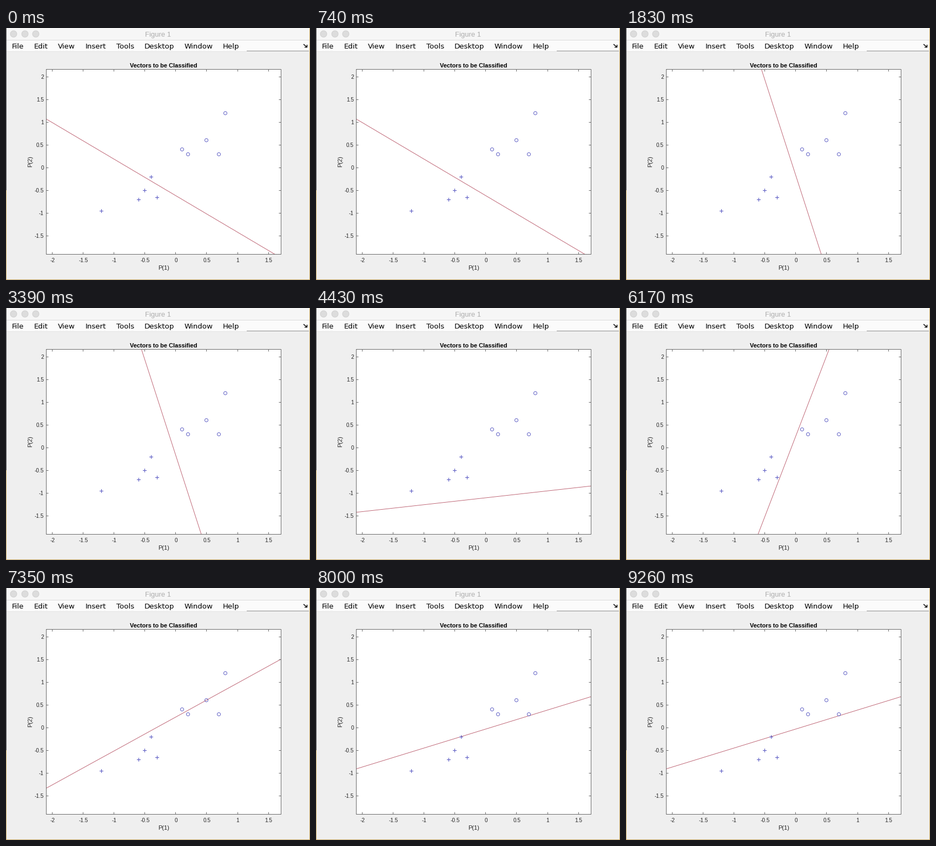
A matplotlib script that plays this animation: 562 by 466 pixels, repeating every 9.3 s.

```python
import math

import matplotlib.pyplot as plt
from matplotlib.animation import FuncAnimation
from matplotlib.patches import Circle, Rectangle

W, H, DPI = 562, 466, 64
LOOP, STEP = 9300, 50
PT = 72 / DPI                      # points per pixel

INK = "#262626"
AXIS = "#6a6a6a"
BLUE = "#5252c0"
RED = "#b9596a"
GOLD = "#c9a860"

LEFT, RIGHT, TOP, BOTTOM = 74.5, 508.5, 76.5, 418.5
CROSSES = [(-1.2, -0.95), (-0.6, -0.7), (-0.5, -0.5), (-0.3, -0.65), (-0.4, -0.2)]
CIRCLES = [(0.1, 0.4), (0.2, 0.3), (0.5, 0.6), (0.7, 0.3), (0.8, 1.2)]

# Training runs: start ms, ms per update, key boundaries (degrees, distance from 0).
# Each leg between two keys takes two updates, so it passes through their mean.
RUNS = [
    (0, 850, [(-38.77, -0.478), (-76.6, -0.0387)]),
    (3600, 900, [(8.64, -1.0875), (74.2, 0.0692)]),
    (6450, 380, [(52.4, -0.027), (36.72, 0.1884), (22.66, -0.0268)]),
]


def px(x):
    return 313.8 + 114.2 * x


def py(y):
    return 258.4 - 84.15 * y


def mid(v):
    """Centre of the pixel that holds v, for crisp strokes."""
    return math.floor(v) + 0.5


fig = plt.figure(figsize=(W / DPI, H / DPI), dpi=DPI, facecolor="#efefef")
ax = fig.add_axes([0, 0, 1, 1])
ax.set_xlim(0, W)
ax.set_ylim(H, 0)
ax.axis("off")


def rect(x, y, w, h, color):
    ax.add_patch(Rectangle((x, y), w, h, fc=color, lw=0))


def stroke(xs, ys, color, width=1, **kw):
    return ax.plot(xs, ys, color=color, lw=width * PT, snap=False,
                   solid_capstyle="butt", **kw)[0]


def label(x, y, s, size, color=INK, font="Liberation Sans", ha="center", **kw):
    kw.setdefault("va", "baseline")
    return ax.text(x, y, s, fontsize=size * PT, color=color, family=font,
                   ha=ha, **kw)


def draw_window():
    rect(0, 0, W, 22, "#f6f6f6")
    rect(0, 22, W, 1, "#dadada")
    rect(0, 23, W, 20, "#fbfbfb")
    for x in (14, 35, 55):
        ax.add_patch(Circle((x, 11), 6, fc="#dcdcdc", ec="#cbcbcb", lw=0.8 * PT))
    label(281.3, 16, "Figure 1", 13, "#adadad")

    x = 10.8
    for word in "File Edit View Insert Tools Desktop Window Help".split():
        item = label(x, 38, word, 13.4, "black", "DejaVu Sans", "left")
        x += item.get_window_extent().width + 18.6
    rect(0, 43, 445, 1, "#e4e4e4")
    rect(445, 42, 115, 1, "#8c8c8c")

    # docking arrow
    stroke([550, 556], [30, 35], "black", 1.4)
    stroke([556.5, 556.5, 552], [31, 35.5, 35.5], "black", 1.4)

    # desktop showing at the window's edges
    rect(0, 0, 1, 300, "#555558")
    rect(0, 300, 1, H - 300, GOLD)
    rect(W - 1, 0, 1, H, GOLD)
    rect(0, H - 1, W, 1, GOLD)


def draw_axes():
    rect(LEFT, TOP, RIGHT - LEFT, BOTTOM - TOP, "white")
    for i in range(-4, 5):
        v = i / 2
        if i < 4:
            x = mid(px(v))
            for y, d in ((BOTTOM, -4), (TOP, 4)):
                stroke([x, x], [y, y + d], AXIS, zorder=5)
            label(px(v) + 0.3, 433, f"{v:g}", 10)
        if i > -4:
            y = mid(py(v))
            for x, d in ((LEFT, 4), (RIGHT, -4)):
                stroke([x, x + d], [y, y], AXIS, zorder=5)
            label(70, py(v) + 3.8, f"{v:g}", 10, ha="right")
    stroke([LEFT, RIGHT, RIGHT, LEFT, LEFT], [TOP, TOP, BOTTOM, BOTTOM, TOP],
           AXIS, zorder=5, solid_joinstyle="miter")

    label(291, 72.7, "Vectors to be Classified", 11, "black", weight="bold")
    label(291.3, 447, "P(1)", 11)
    label(44.8, 247, "P(2)", 11, rotation=90, va="center")


def draw_points():
    for x, y in CROSSES:
        cx, cy = mid(px(x)), mid(py(y))
        stroke([cx - 3.5, cx + 3.5], [cy, cy], BLUE, zorder=4)
        stroke([cx, cx], [cy - 3.5, cy + 3.5], BLUE, zorder=4)
    for x, y in CIRCLES:
        ax.add_patch(Circle((mid(px(x)), mid(py(y))), 3, fc="none", ec=BLUE,
                            lw=0.9 * PT, zorder=4))


def boundary(t):
    """Slope and intercept of the decision line at time t."""
    start, pace, keys = [run for run in RUNS if run[0] <= t][-1]
    n = min((t - start) // pace, 2 * (len(keys) - 1))
    a, b = keys[n // 2], keys[(n + 1) // 2]
    angle = math.radians((a[0] + b[0]) / 2)
    return math.tan(angle), (a[1] + b[1]) / 2 / math.cos(angle)


draw_window()
draw_axes()
draw_points()

line = stroke([], [], RED, 0.9, zorder=3)
line.set_clip_path(Rectangle((LEFT, TOP), RIGHT - LEFT, BOTTOM - TOP,
                             transform=ax.transData))


def update(i):
    slope, offset = boundary(i * STEP)
    ends = (-2.1, 1.72)
    line.set_data([px(x) for x in ends], [py(slope * x + offset) for x in ends])
    return (line,)


anim = FuncAnimation(fig, update, frames=LOOP // STEP, interval=STEP,
                     repeat=True, repeat_delay=0, blit=False)
plt.show()
```
